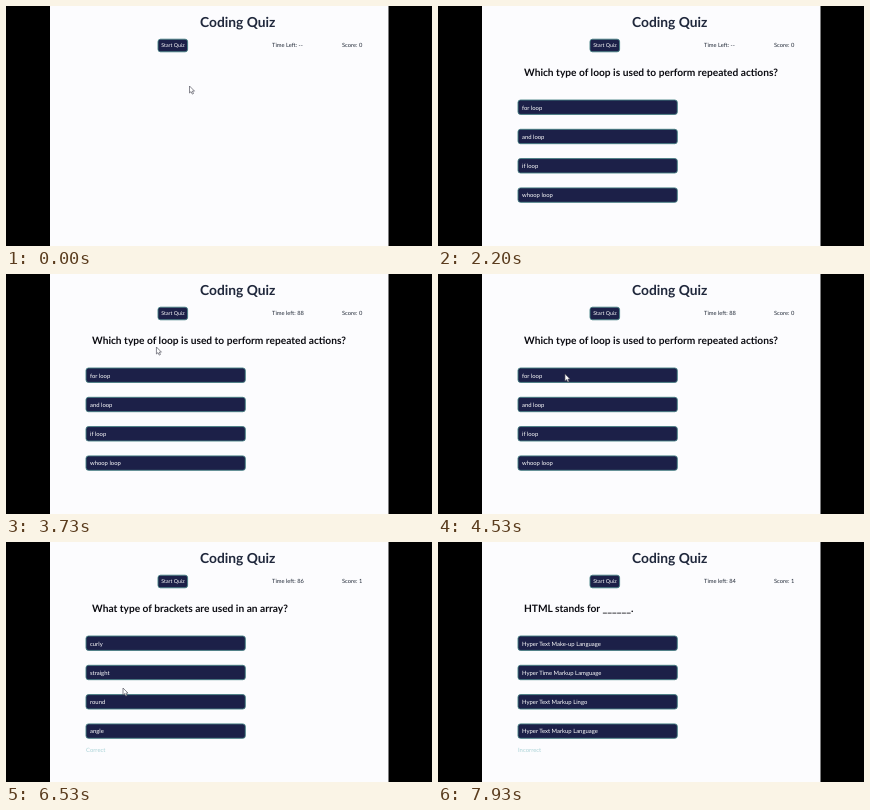
An HTML page that plays this animation: 426x240 px, repeating every 8000 ms.

```html
<!DOCTYPE html>
<html lang="en">
<head>
<meta charset="utf-8">
<title>Coding Quiz</title>
<style>
  html, body { margin: 0; height: 100%; overflow: hidden; background: #000; }
  svg { display: block; width: 100vw; height: 100vh; }
  text { font: 5.75px Lato, sans-serif; fill: #222a38; text-rendering: geometricPrecision; white-space: pre; }
  .title { font-size: 13.8px; font-weight: 700; fill: #20283c; }
  .question { font-size: 10.2px; font-weight: 700; fill: #0c0c12; }
  .button rect { fill: #1c2048; stroke: #447f83; stroke-width: .9; }
  .button text { font-size: 5.9px; fill: #fff; }
  .button .small { font-size: 5.3px; }
  .feedback { font-size: 5.9px; fill: #a9d2d6; }
  .cursor { fill: #fff; stroke: #555560; stroke-width: .7; }
</style>
</head>
<body>
<svg viewBox="0 0 426 240">
  <rect x="44" width="338.5" height="240" fill="#fcfcfe"/>
  <text class="title" x="194" y="20.6">Coding Quiz</text>
  <g class="button">
    <rect x="152" y="33.2" width="29.6" height="12.6" rx="2.5"/>
    <text class="small" x="155.3" y="41.3">Start Quiz</text>
  </g>
  <text id="timer" x="266" y="41.2"></text>
  <text id="score" x="336" y="41.2"></text>
  <g id="quiz">
    <text class="question" id="question" x="86" y="70.4"></text>
    <g id="answers"></g>
    <text class="feedback" id="feedback" x="80" y="210.2"></text>
  </g>
  <path class="cursor" id="cursor" d="M0 0V7L1.6 5.6L2.8 8.1L4 7.5L2.9 5.1H5Z"/>
</svg>
<script>
const LOOP = 8000;
const FIRST_TICK = 2730;

const screens = [
  { at: 1730, score: 0, feedback: "",
    question: "Which type of loop is used to perform repeated actions?",
    answers: ["for loop", "and loop", "if loop", "whoop loop"] },
  { at: 4760, score: 1, feedback: "Correct",
    question: "What type of brackets are used in an array?",
    answers: ["curly", "straight", "round", "angle"] },
  { at: 7330, score: 1, feedback: "Incorrect",
    question: "HTML stands for ______.",
    answers: ["Hyper Text Make-up Language", "Hyper Time Markup Lamguage",
              "Hyper Text Markup Lingo", "Hyper Text Markup Language"] },
];

// Pointer moves: start time, end time, from, to
const moves = [
  [350, 1200, [183.5, 80], [169, 40]],
  [3400, 4330, [160, 62], [127, 100]],
  [5750, 6500, [127, 100], [117, 146]],
  [6700, 7200, [117, 146], [116, 156]],
];
const hidden = [[1800, 3400], [7400, LOOP]];

const $ = id => document.getElementById(id);
const setText = (node, value) => { if (node.textContent !== value) node.textContent = value; };
const ease = p => p * p * (3 - 2 * p);

$("answers").innerHTML = [0, 1, 2, 3].map(i => `
  <g class="button" transform="translate(80 ${94 + i * 29.3})">
    <rect width="159.3" height="14.4" rx="2.5"/>
    <text x="4" y="9.6"></text>
  </g>`).join("");
const labels = document.querySelectorAll("#answers text");

function pointerAt(t) {
  const [start, end, from, to] = moves.findLast(m => t >= m[0]) || moves[0];
  const p = ease(Math.min(1, Math.max(0, (t - start) / (end - start))));
  return from.map((v, i) => v + (to[i] - v) * p);
}

function draw(t) {
  const screen = screens.findLast(s => t >= s.at);
  $("quiz").style.display = screen ? "" : "none";
  if (screen) {
    setText($("question"), screen.question);
    setText($("feedback"), screen.feedback);
    labels.forEach((label, i) => setText(label, screen.answers[i]));
  }
  setText($("score"), `Score: ${screen ? screen.score : 0}`);
  setText($("timer"), t < FIRST_TICK ? "Time Left: --"
    : `Time left: ${89 - Math.floor((t - FIRST_TICK) / 1000)}`);

  const [x, y] = pointerAt(t);
  $("cursor").setAttribute("transform", `translate(${x} ${y})`);
  $("cursor").style.display = hidden.some(([a, b]) => t >= a && t < b) ? "none" : "";
}

function frame() {
  draw(performance.now() % LOOP);
  requestAnimationFrame(frame);
}
frame();
</script>
</body>
</html>
```
